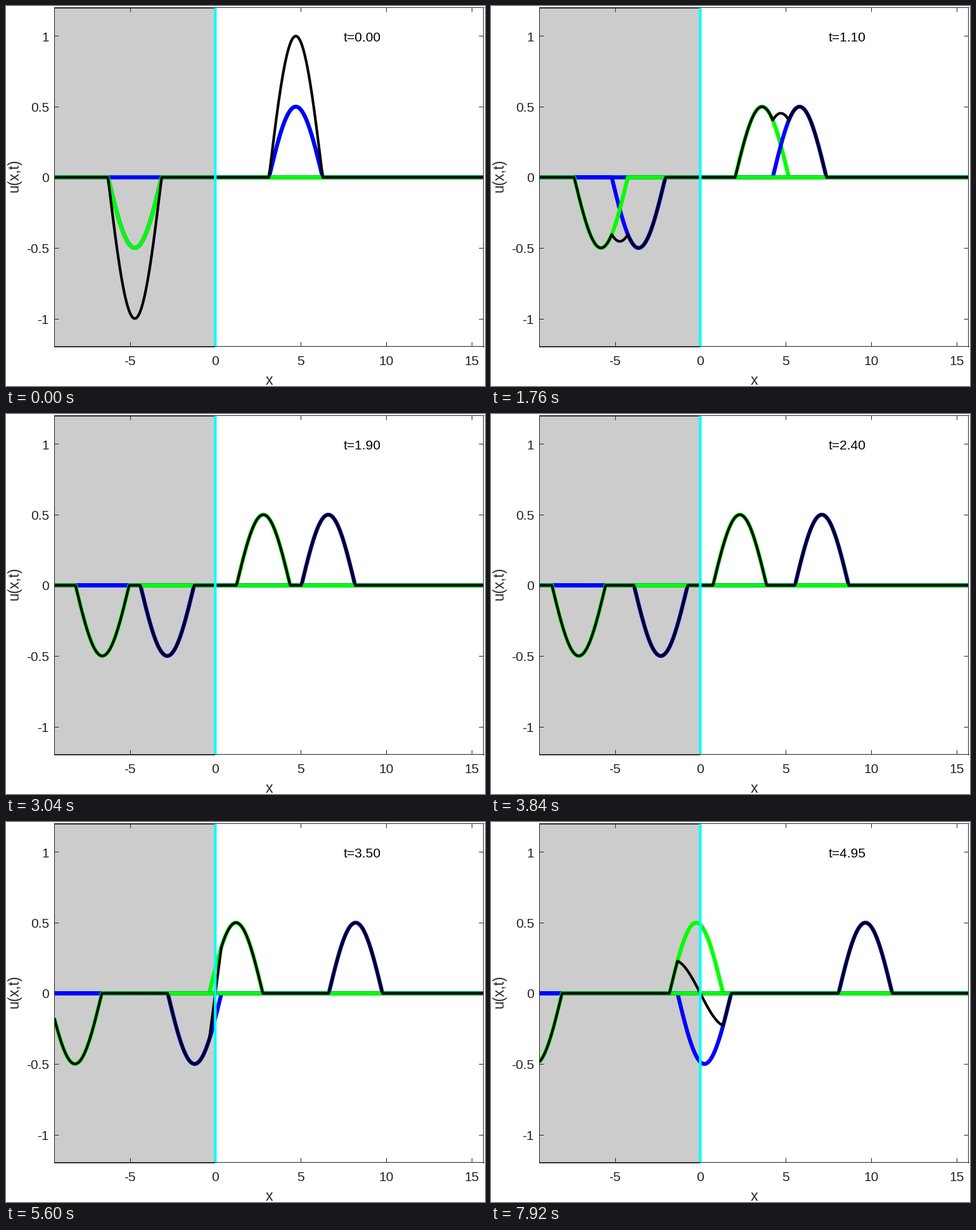
Recreate the animation shown at these times as a matplotlib script. Size 756 px wide and 600 px high, loop 8000 ms.

```python
import numpy as np
import matplotlib.pyplot as plt
from matplotlib.animation import FuncAnimation

W, H, DPI = 756, 600, 96
PX = 72 / DPI  # points per pixel
LEFT, RIGHT, TOP, BOTTOM = 76.2, 753.9, 2.9, 538.1
FRAMES, INTERVAL, DT = 100, 80, 0.05
X_MIN, X_MAX, Y_MAX = -3 * np.pi, 5 * np.pi, 1.2
INK = (0.15, 0.15, 0.15)

plt.rcParams["font.family"] = "Liberation Sans"
fig = plt.figure(figsize=(W / DPI, H / DPI), dpi=DPI, facecolor="white")
ax = fig.add_axes([LEFT / W, 1 - BOTTOM / H, (RIGHT - LEFT) / W, (BOTTOM - TOP) / H])
ax.set(xlim=(X_MIN, X_MAX), ylim=(-Y_MAX, Y_MAX))
ax.set_axisbelow("line")


def label(px, py, text, size=21, color=INK, **kw):
    """Place text with its baseline at a pixel position."""
    return fig.text(px / W, 1 - py / H, text, fontsize=size * PX,
                    color=color, va="baseline", **kw)


def to_px(x, y):
    return (LEFT + (x - X_MIN) / (X_MAX - X_MIN) * (RIGHT - LEFT),
            TOP + (Y_MAX - y) / (2 * Y_MAX) * (BOTTOM - TOP))


# The frame sits on whole pixels, slightly off the data limits.
for side, shift in (("top", 0.7), ("bottom", -0.8), ("right", -0.6)):
    ax.spines[side].set_position(("outward", shift * PX))
for spine in ax.spines.values():
    spine.set(linewidth=PX, edgecolor=INK)

x_ticks = [-5, 0, 5, 10, 15]
y_ticks = [-1, -0.5, 0, 0.5, 1]
ax.set_xticks(x_ticks)
ax.set_yticks(y_ticks)
ax.tick_params(direction="in", length=6.8 * PX, width=PX, color=INK, top=True,
               right=True, labelbottom=False, labelleft=False)
for x in x_ticks:
    label(to_px(x, 0)[0], 567, f"{x}", ha="center")
for y in y_ticks:
    label(68, to_px(0, y)[1] + 8, f"{y:g}", ha="right")
label(415, 597.5, "x", size=23, ha="center")
label(20, 294.5, "u(x,t)", size=23, rotation=90, rotation_mode="anchor")

ax.axvspan(X_MIN, 0, facecolor="0.8", edgecolor="none")
for y in (-Y_MAX, Y_MAX):
    ax.plot([X_MIN, 0], [y, y], color="black", linewidth=1.5 * PX,
            clip_on=False, solid_capstyle="butt")


def curve(color, width):
    return ax.plot([], [], color=color, linewidth=width * PX,
                   solid_capstyle="butt", solid_joinstyle="round")[0]


# Back to front: incident left-mover, right-mover, then their odd images.
parts = [curve(c, 6.25) for c in ((0, 1, 0), (0, 0, 1), (0, 0, 1), (0, 1, 0))]
total = curve("black", 4.17)
ax.axvline(0, color=(0, 1, 1), linewidth=4.17 * PX, snap=False)
clock = label(to_px(7.5, 0)[0], 56, "", color="black")

xs = np.linspace(X_MIN, X_MAX, 2400)


def bump(x):
    return np.where((x >= np.pi) & (x <= 2 * np.pi), -np.sin(x), 0)


def update(n):
    t = n * DT
    waves = [bump(xs + t) / 2, bump(xs - t) / 2,
             -bump(t - xs) / 2, -bump(-xs - t) / 2]
    for line, wave in zip(parts, waves):
        line.set_data(xs, wave)
    total.set_data(xs, sum(waves))
    clock.set_text(f"t={t:.2f}")
    return [*parts, total, clock]


anim = FuncAnimation(fig, update, frames=FRAMES, interval=INTERVAL,
                     repeat=True, repeat_delay=0, blit=False)
plt.show()
```
